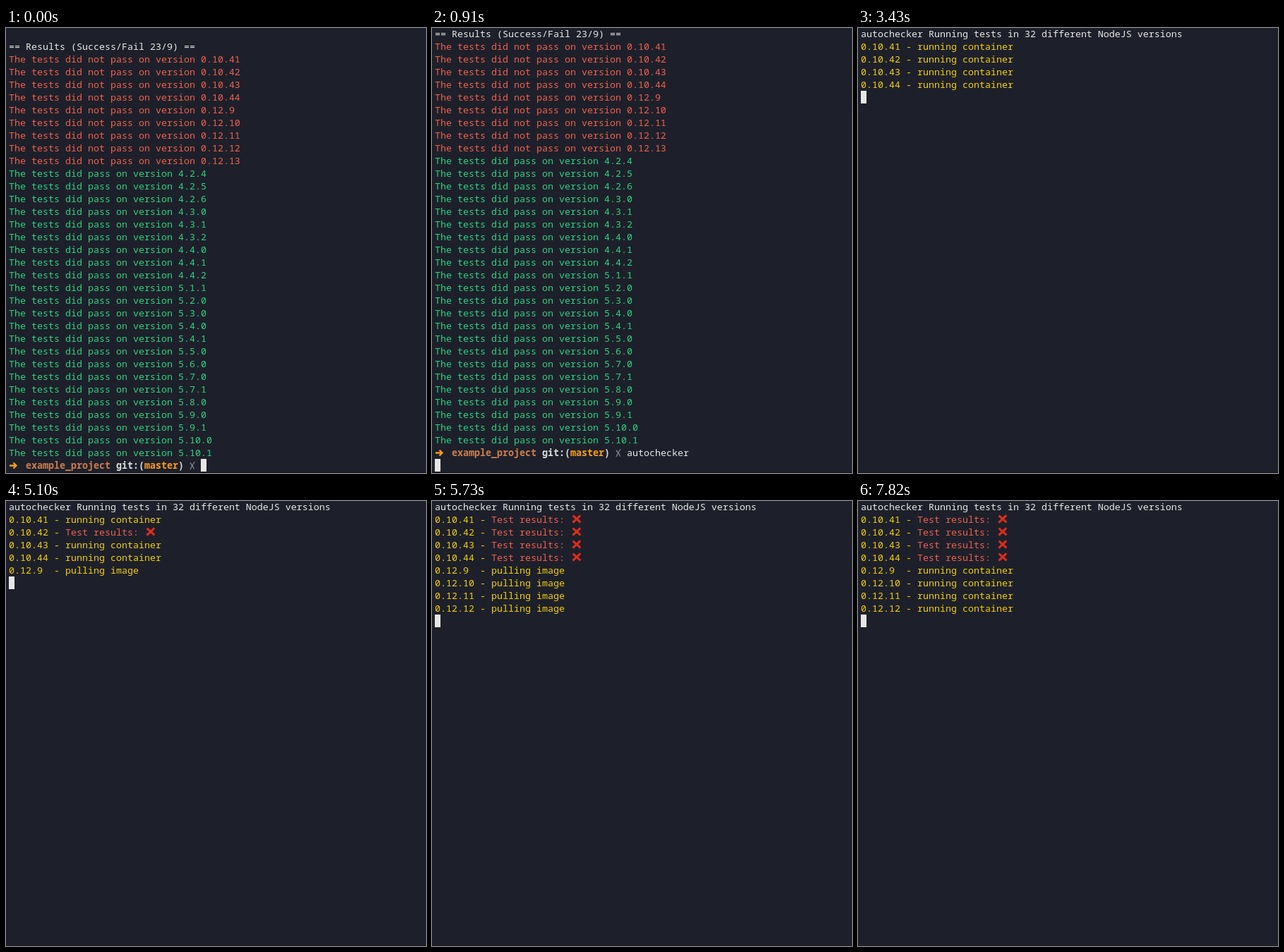
Recreate the animation shown at these times as an HTML page. Size 595 by 631 pixels, loop 8 s.

```html
<!DOCTYPE html>
<html lang="en">
<head>
<meta charset="utf-8">
<title>Terminal test run</title>
<style>
  html, body { margin: 0; width: 100%; height: 100%; overflow: hidden; background: #1d202a; }
  svg { display: block; }
  text { font: 13.333px "Noto Sans Mono", monospace; font-variant-ligatures: none; white-space: pre; }
  .bold { font-weight: 700; }
</style>
</head>
<body>
<svg id="stage" width="595" height="631" viewBox="0 0 595 631">
  <rect width="595" height="631" fill="#1d202a"/>
  <rect y="630" width="595" height="1" fill="#15171e"/>
  <g id="screen"></g>
</svg>
<script>
const LOOP = 8000, COL = 8, ROW = 18, LEFT = 4;
const WHITE = '#e9e9e9', RED = '#f0604d', GREEN = '#2fd283', YELLOW = '#f3cf0c',
      ORANGE = '#fb9c20', BROWN = '#cf7d50', GREY = '#8b8d91', CROSS = '#df2c1c';

const failed = '0.10.41 0.10.42 0.10.43 0.10.44 0.12.9 0.12.10 0.12.11 0.12.12 0.12.13'.split(' ');
const passed = ('4.2.4 4.2.5 4.2.6 4.3.0 4.3.1 4.3.2 4.4.0 4.4.1 4.4.2 5.1.1 5.2.0 5.3.0 ' +
  '5.4.0 5.4.1 5.5.0 5.6.0 5.7.0 5.7.1 5.8.0 5.9.0 5.9.1 5.10.0 5.10.1').split(' ');

const px = col => LEFT + col * COL;

const write = (row, col, str, fill, bold) =>
  `<text x="${px(col)}" y="${row * ROW + 13}" fill="${fill}"${bold ? ' class="bold"' : ''}>${str}</text>`;

const cursor = (row, col = 0) =>
  `<rect x="${px(col)}" y="${row * ROW - 1}" width="8" height="18" fill="#e6e6e6"/>`;

const stroke = (row, col, d, color, width, cap = 'butt') =>
  `<path transform="translate(${px(col)} ${row * ROW})" d="${d}" fill="none" stroke="${color}" stroke-width="${width}" stroke-linecap="${cap}"/>`;

function prompt(row, command) {
  return stroke(row, 0, 'M1 8.5H10M6.5 4.5L10.5 8.5L6.5 12.5', ORANGE, 2.3) +
    write(row, 3, 'example_project', BROWN, true) +
    write(row, 19, 'git:(', '#dcdddf', true) +
    write(row, 24, 'master', ORANGE, true) +
    write(row, 30, ')', '#dcdddf', true) +
    stroke(row, 32, 'M1.2 13.5Q3.5 8 7 3.5M1.2 5Q4 8 6.5 13', GREY, 1.2, 'round') +
    write(row, 34, command, WHITE);
}

// Summary of the previous run, with the prompt below it
function summary(top, command, cursorRow, cursorCol) {
  let out = write(top, 0, '== Results (Success/Fail 23/9) ==', WHITE), row = top + 1;
  for (const v of failed) out += write(row++, 0, 'The tests did not pass on version ' + v, RED);
  for (const v of passed) out += write(row++, 0, 'The tests did pass on version ' + v, GREEN);
  return out + prompt(row, command) + cursor(cursorRow, cursorCol);
}

const labels = { p: 'pulling image', b: 'building image', r: 'running container' };

// One letter per version: p, b, r as above, x for a failed test
function progress(codes) {
  let out = write(0, 0, 'autochecker Running tests in 32 different NodeJS versions', WHITE);
  [...codes].forEach((code, i) => {
    const row = i + 1, head = failed[i].padEnd(8) + '- ';
    if (code === 'x') {
      out += write(row, 0, head, YELLOW) + write(row, 10, 'Test results:', RED) +
        stroke(row, 24, 'M3.6 2.6L14.4 12.4M14.2 2.4L3.4 12.6', CROSS, 3);
    } else {
      out += write(row, 0, head + labels[code], YELLOW);
    }
  });
  return out + cursor(codes.length + 1);
}

const scenes = [
  [0, summary(1, '', 34, 34)],
  [500, summary(1, 'autochecker', 34, 45)],
  [910, summary(0, 'autochecker', 34, 0)],
  [1120, progress('pppp')],
  [3430, progress('rrrr')],
  [5100, progress('rxrrp')],
  [5520, progress('rxrxpp')],
  [5730, progress('xxxxpppp')],
  [7190, progress('xxxxbppp')],
  [7400, progress('xxxxrppp')],
  [7610, progress('xxxxrbpp')],
  [7820, progress('xxxxrrrr')]
];

const screen = document.getElementById('screen');
const start = performance.now();
let shown = null;

function draw(now) {
  const t = Math.max(0, now - start) % LOOP;
  const scene = scenes.filter(s => s[0] <= t).pop();
  if (scene !== shown) {
    screen.innerHTML = scene[1];
    shown = scene;
  }
  requestAnimationFrame(draw);
}
draw(start);
</script>
</body>
</html>
```
